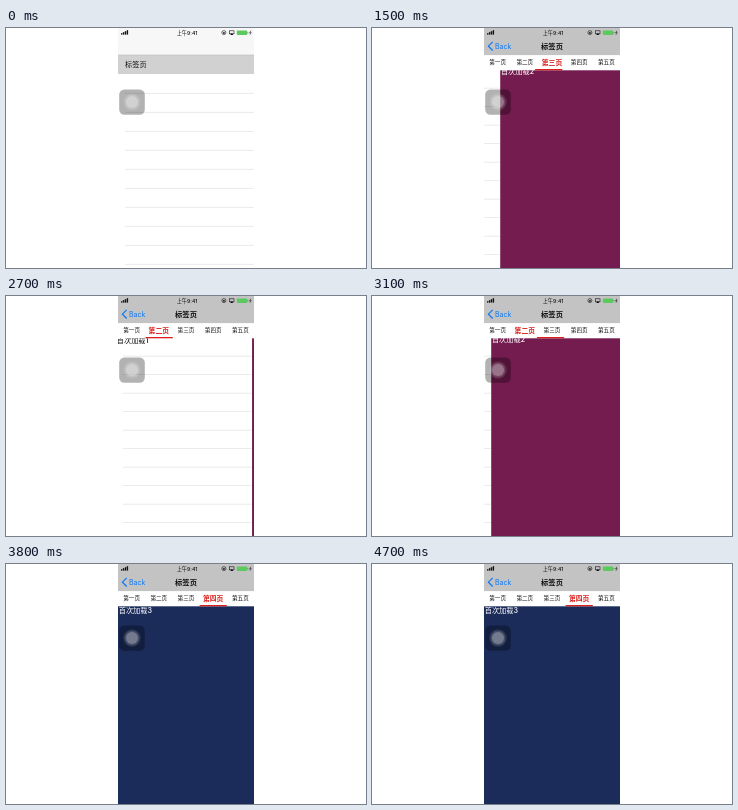
Animation of 360 by 240 pixels, one loop 4.8 s. Source, as an HTML page with a canvas:

```html
<!DOCTYPE html>
<html lang="zh">
<head>
<meta charset="utf-8">
<title>标签页</title>
<style>
html, body { margin: 0; width: 100%; height: 100%; overflow: hidden; background: #fff; }
canvas { display: block; width: 360px; height: 240px; }
</style>
</head>
<body>
<canvas id="stage"></canvas>
<script>
const LEFT = 112, WIDTH = 136, TAB = WIDTH / 5, LOOP = 4800, STEP = 100;
const NAV = 27.3, TOP = 42.3; // bottom edges of the title bar and the tab bar
const RED = '#d8201c', BLUE = '#0a78f5', INK = '#111';
const TABS = ['第一页', '第二页', '第三页', '第四页', '第五页'];
const PAGES = { 1: '#fff', 2: '#741b4f', 3: '#1b2c5b' };
// Swipes: start, end, first page, last page
const SWIPES = [[1300, 1945, 2, 1], [2600, 3255, 1, 2], [3255, 3800, 2, 3]];

const canvas = document.getElementById('stage');
const c = canvas.getContext('2d');
const scale = window.devicePixelRatio || 1;
canvas.width = 360 * scale;
canvas.height = 240 * scale;

const easeInOut = u => u < .5 ? 4 * u ** 3 : 1 - 4 * (1 - u) ** 3;
const easeOut = u => 1 - (1 - u) ** 3;

function rect(x, y, w, h, color) {
  c.fillStyle = color;
  c.fillRect(x, y, w, h);
}

function disc(x, y, r, color) {
  c.fillStyle = color;
  c.beginPath();
  c.arc(x, y, r, 0, 7);
  c.fill();
}

function rounded(x, y, w, h, r, color) {
  c.fillStyle = color;
  c.beginPath();
  c.roundRect(x, y, w, h, r);
  c.fill();
}

function stroke(points, color, width) {
  c.strokeStyle = color;
  c.lineWidth = width;
  c.beginPath();
  points.forEach(([x, y]) => c.lineTo(x, y));
  c.stroke();
}

function text(s, x, y, size, color = INK, align = 'left', weight = 400) {
  c.font = `${weight} ${size}px Inter, "Noto Sans CJK SC", "Noto Sans CJK", sans-serif`;
  c.textAlign = align;
  c.fillStyle = color;
  c.fillText(s, x, y);
}

function rows(x, y, gap) {
  for (; y < 240; y += gap) rect(x + 7, y, WIDTH - 7, .7, '#e2e2e4');
}

function menu(x) {
  rect(x, NAV, WIDTH, 240 - NAV, '#fff');
  rect(x, 27, WIDTH, 19, '#d1d1d1');
  rect(x, 26.7, WIDTH, .6, '#b8b8b8');
  text('标签页', x + 7, 39.4, 7.2, INK, 'left', 500);
  rows(x, 64.9, 19);
}

function page(i, x, moving) {
  rect(x, 42, WIDTH, 198, PAGES[i]);
  if (i === 1) rows(x, 61.6 - 1.8 * moving, 18.5);
  const y = (i === 1 ? 50.6 : 49) - 3.2 * moving;
  text('首次加载' + i, x + .7, y, 7.2, i === 1 ? INK : '#fff', 'left', 500);
}

function tabs(x, pos, selected) {
  rect(x, NAV, WIDTH, TOP - NAV, '#fff');
  TABS.forEach((name, i) => {
    const on = i === selected;
    text(name, x + TAB * (i + .5), on ? 36.7 : 36.3, on ? 6.8 : 5.6,
      on ? RED : INK, 'center', on ? 700 : 500);
  });
  rect(x + TAB * pos, TOP - 1.3, TAB, 1.3, RED);
}

function tabScreen(x, t) {
  let pos = 2, selected = 2, moving = false;
  for (const [start, end, from, to] of SWIPES) {
    if (t <= start) break;
    const u = Math.min(1, (t - start) / (end - start));
    pos = from + (to - from) * easeInOut(u);
    moving = u < 1;
    if (!moving) selected = to;
  }
  for (const i of [1, 2, 3]) {
    if (Math.abs(i - pos) < 1) page(i, x + (i - pos) * WIDTH, moving);
  }
  tabs(x, pos, selected);
}

function navBar(k) {
  rect(LEFT, 0, WIDTH, NAV, '#f7f7f7');
  c.globalAlpha = k;
  rect(LEFT, 0, WIDTH, NAV, '#c3c3c3');
  stroke([[120.7, 13.9], [116.4, 18.2], [120.7, 22.5]], BLUE, 1.2);
  text('Back', 123, 20.8, 7, BLUE);
  text('标签页', 180 + (1 - k) * 60, 20.8, 7.3, INK, 'center', 700);
  c.globalAlpha = 1;
}

function statusBar() {
  for (let i = 0; i < 4; i++) rect(115 + i * 1.9, 5.2 - i, 1.4, 1.4 + i, INK);
  text('上午9:41', 181, 6.6, 5.2, INK, 'center', 500);
  c.strokeStyle = INK;
  c.lineWidth = .6;
  c.beginPath();
  c.arc(217.9, 4.6, 2, 0, 7);
  c.stroke();
  rect(217, 4.2, 1.8, 1.4, INK);
  c.strokeRect(223.6, 2.8, 4.4, 3);
  c.fillStyle = INK;
  c.beginPath();
  c.moveTo(225.8, 4.9);
  c.lineTo(227.4, 7);
  c.lineTo(224.2, 7);
  c.fill();
  rounded(230.8, 2.4, 10.4, 4.7, 1, '#5cc95f');
  rect(241.6, 4, .6, 1.5, '#555');
  stroke([[244.9, 2.8], [243.6, 4.8], [245.2, 4.6], [243.9, 6.7]], INK, .6);
}

function floatingButton() {
  rounded(113.2, 61.4, 25.6, 25.4, 5.2, 'rgba(0,0,0,.3)');
  disc(126, 74, 8.8, 'rgba(255,255,255,.1)');
  disc(126, 74, 7.4, 'rgba(255,255,255,.13)');
  disc(126, 74, 6, 'rgba(255,255,255,.25)');
}

function draw(t) {
  c.setTransform(scale, 0, 0, scale, 0, 0);
  rect(0, 0, 360, 240, '#fff');
  c.save();
  c.beginPath();
  c.rect(LEFT, 0, WIDTH, 240);
  c.clip();
  const push = t < 300 ? 0 : easeOut(Math.min(1, (t - 220) / 380));
  navBar(push);
  if (push < 1) menu(LEFT - push * WIDTH * .3);
  if (push > 0) tabScreen(LEFT + (1 - push) * WIDTH, t);
  statusBar();
  floatingButton();
  c.restore();
}

const origin = performance.now();
function tick() {
  const t = (performance.now() - origin) % LOOP;
  draw(Math.floor(t / STEP) * STEP);
  requestAnimationFrame(tick);
}
tick();
</script>
</body>
</html>
```
